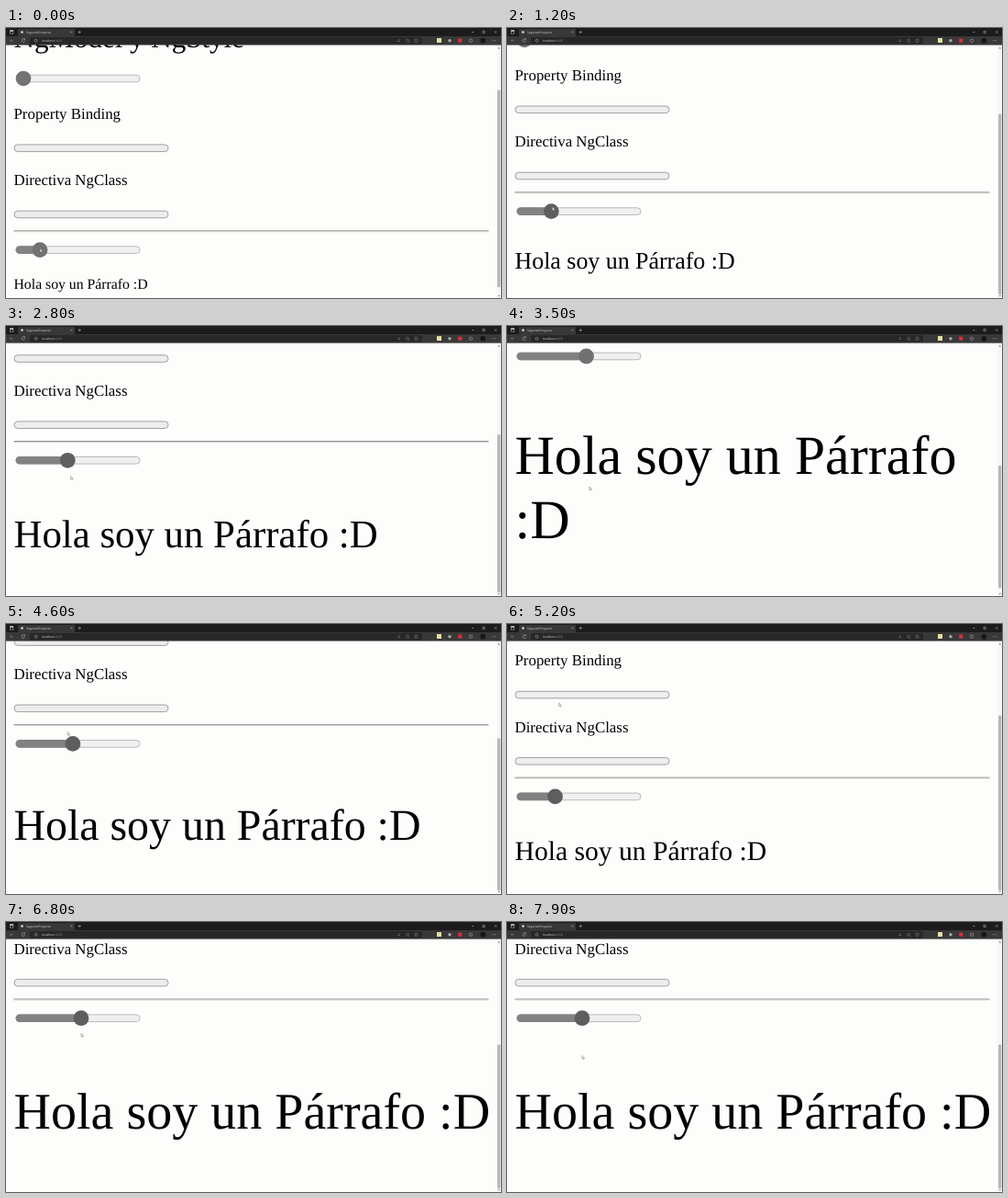
An HTML page that plays this animation: 540 by 294 pixels, repeating every 8 s.

```html
<!DOCTYPE html>
<html lang="es">
<head>
<meta charset="utf-8">
<title>Property Binding</title>
<style>
  html, body { margin: 0; width: 100%; height: 100%; overflow: hidden; background: #fdfdfb; }
  svg { display: block; width: 540px; height: 294px; }
  #page text { font-family: "Liberation Serif", "Times New Roman", serif; fill: #000; text-rendering: geometricPrecision; }
  .label { font-size: 16.85px; }
  .title { font-size: 31px; }
  .chrome text { font: 3.3px "Open Sans", sans-serif; fill: #ddd; text-rendering: geometricPrecision; }
  .bar { fill: #ededed; stroke: #a0a0a0; }
  .track { fill: #f0f0f0; stroke: #bababa; }
  .line { fill: none; stroke: #aaa; stroke-width: .6; }
</style>
</head>
<body>
<svg viewBox="0 0 540 294">
  <rect width="540" height="294" fill="#fdfdfb"/>

  <!-- y = 0 is the horizontal rule -->
  <g id="page">
    <text class="title" x="8.5" y="-200">NgModel y NgStyle</text>
    <rect class="track" x="11" y="-170" width="135" height="7.6" rx="3.8"/>
    <circle cx="19" cy="-166.2" r="8.3" fill="#737373"/>
    <text class="label" x="8.5" y="-122">Property Binding</text>
    <rect class="bar" x="9" y="-94.2" width="168" height="7.6" rx="3.8"/>
    <text class="label" x="8.5" y="-49.8">Directiva NgClass</text>
    <rect class="bar" x="9" y="-22" width="168" height="7.6" rx="3.8"/>
    <rect x="8.5" y="-.8" width="518" height="1" fill="#8c8c8c"/>
    <rect x="8.5" y=".2" width="518" height=".8" fill="#c8c8c8"/>
    <rect class="track" x="11" y="16.6" width="135" height="7.6" rx="3.8"/>
    <rect id="fill" x="10.5" y="16.1" height="8.6" rx="4.3" fill="#828282"/>
    <circle id="knob" cy="20.4" r="8.4"/>
    <text id="para" x="8.5"></text>
    <text id="rest" x="8.5">:D</text>
  </g>

  <rect x="535.5" y="19" width="4.5" height="275" fill="#f6f6f5"/>
  <rect id="thumb" x="536" width="3.4" fill="#b9b9b9"/>
  <path d="M536.6 22.4l1.2-1.6 1.2 1.6zM536.6 291l1.2 1.6 1.2-1.6z" fill="#777"/>

  <path id="cursor" d="M0 0v3.6l.9-.8.6 1.3.6-.3-.6-1.2h1.1z" fill="#fff" stroke="#777" stroke-width=".5"/>

  <g class="chrome">
    <rect width="540" height="9" fill="#1c1c1c"/>
    <rect y="9" width="540" height="9.6" fill="#383838"/>
    <path d="M13 9V2q0-1 1-1h60q1 0 1 1v7z" fill="#383838"/>
    <rect x="26" y="10" width="428" height="7.6" rx="1.5" fill="#272727"/>
    <rect class="line" x="4.5" y="2.7" width="3.4" height="3.4"/>
    <rect x="4.5" y="2.5" width="3.4" height="1.3" fill="#ddd"/>
    <circle cx="17.5" cy="4.5" r="1.3" fill="#ddd"/>
    <text x="22" y="5.6">SegundoProyecto</text>
    <path class="line" d="M70.3 3.5l2 2m0-2l-2 2M78.5 4.5h3.4m-1.7-1.7v3.4"/>
    <path class="line" d="M508 4.5h2.4M520 3.3h2.3v2.3h-2.3zM533 3.3l2.3 2.3m0-2.3l-2.3 2.3"/>
    <path class="line" d="M8 13.7H4.5m1.5-1.5l-1.5 1.5 1.5 1.5" opacity=".6"/>
    <path class="line" d="M20.3 12.4a1.8 1.8 0 1 0 .3 1.8M20.5 11.4v1.4h-1.4"/>
    <circle class="line" cx="32.6" cy="13.7" r="1.4"/>
    <text x="39" y="14.9">localhost<tspan fill="#888">:4200</tspan></text>
    <path class="line" d="M427 14.5h3m-2-1.6h2M439 15.1l1.1 1M446 12.2h3v3h-3z" opacity=".6"/>
    <circle class="line" cx="438" cy="13.6" r="1.5" opacity=".6"/>
    <rect x="470" y="11" width="5" height="5" fill="#e4dfa0"/>
    <circle cx="484" cy="13.7" r="1.7" fill="#aaa"/>
    <rect x="493.2" y="11.6" width="4.2" height="4.2" rx=".8" fill="#d92f35"/>
    <circle class="line" cx="507" cy="13.7" r="1.7"/>
    <circle cx="520.3" cy="13.7" r="2.9" fill="#171717"/>
    <path class="line" d="M529.8 13.7h4.4" stroke-dasharray="1 .7"/>
  </g>
</svg>
<script>
const $ = id => document.getElementById(id);
const set = (el, attrs) => { for (const k in attrs) el.setAttribute(k, attrs[k]); };
const [page, fill, knob, para, rest, thumb, cursor] =
  ["page", "fill", "knob", "para", "rest", "thumb", "cursor"].map($);

// Turning points of the drag: [seconds, position]
const drag = [[.1, 37], [1.7, 53.5], [2.3, 53.5], [3.7, 92], [4.2, 92], [5.1, 49], [5.9, 77], [6.8, 82]];
const height = [[.1, 240.5], [2.2, 153.5], [3.5, 175], [5.2, 86], [7.9, 145.5]];
const lead = .12; // the pointer runs ahead of the knob

function at(keys, t) {
  const i = keys.findIndex(k => k[0] > t);
  if (i < 0) return keys[keys.length - 1][1];
  if (i === 0) return keys[0][1];
  const [t0, a] = keys[i - 1], [t1, b] = keys[i];
  return a + (b - a) * (t - t0) / (t1 - t0);
}

function draw(t) {
  const x = at(drag, t);
  const size = .895 * (x - 19.4);
  const wraps = size > 56.4;
  const loose = wraps || t < .3; // not yet scrolled fully down
  const total = 291.2 + size * (wraps ? 4.3 : 3.15);
  const scroll = total - 275 - (loose ? 10 : 0);
  const base = 32.3 + 1.934 * size;

  set(page, { transform: `translate(0 ${277 - scroll})` });
  set(fill, { width: x - 10.5 });
  set(knob, { cx: x, fill: loose ? "#717171" : "#5e5e5e" });
  para.textContent = "Hola soy un Párrafo" + (wraps ? "" : " :D");
  set(para, { y: base, "font-size": size });
  set(rest, { y: base + 1.16 * size, "font-size": size, visibility: wraps ? "visible" : "hidden" });
  set(thumb, { y: 24 + 266 * scroll / total, height: 266 * 275 / total });
  set(cursor, { transform: `translate(${at(drag, t + lead)} ${at(height, t)})` });
}

function tick() {
  draw(Math.floor(performance.now() % 8000 / 100) / 10);
  requestAnimationFrame(tick);
}
tick();
</script>
</body>
</html>
```
